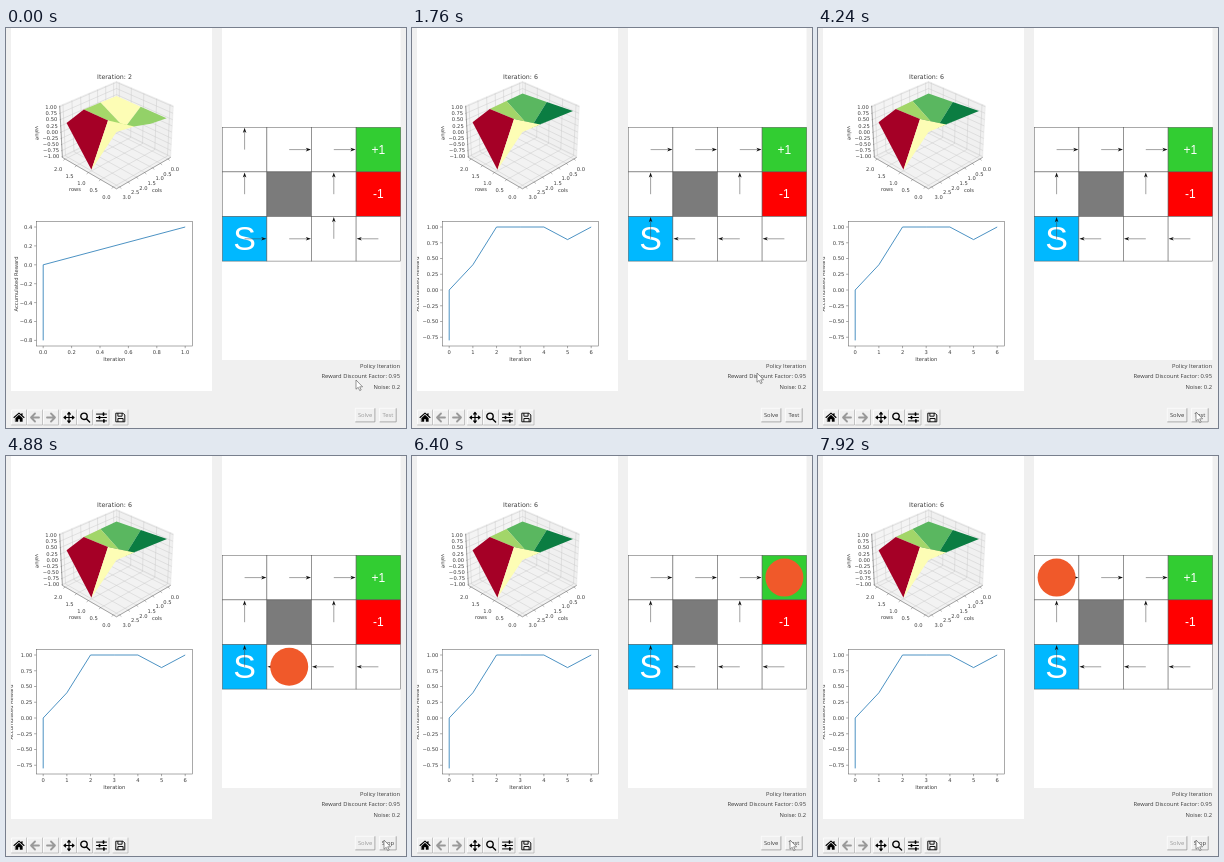
Animation of 400 by 400 pixels, one loop 8 s. Source, as an HTML page:

```html
<!DOCTYPE html>
<html lang="en">
<head>
<meta charset="utf-8">
<title>Policy iteration on a grid world</title>
<style>
  html, body { margin: 0; width: 100%; height: 100%; overflow: hidden; background: #f0f0f0; }
  svg { display: block; width: 100vw; height: 100vh; }
  .plot text { font: 5.2px "DejaVu Sans", sans-serif; fill: #3c3c3c; }
  .plot .title { font-size: 6.3px; }
  .ui { font: 5.8px "Open Sans", sans-serif; fill: #3a3a3a; }
  .cell { font-family: "Liberation Sans", Arial, sans-serif; fill: #fff; }
</style>
</head>
<body>
<svg id="stage" viewBox="0 0 400 400">
  <clipPath id="panel"><rect x="5" width="201" height="363"/></clipPath>
  <rect width="400" height="400" fill="#f0f0f0"/>
  <rect x="5" width="201" height="363" fill="#fff"/>
  <rect x="216" width="178.5" height="332" fill="#fff"/>
  <g class="plot" clip-path="url(#panel)">
    <g id="cube"></g>
    <g id="surface"></g>
    <g id="chart"></g>
  </g>
  <g id="world"></g>
  <g id="arrows"></g>
  <circle id="agent" r="19" fill="#f0592a"/>
  <g class="ui" text-anchor="end">
    <text x="394" y="339.5">Policy Iteration</text>
    <text x="394" y="350">Reward Discount Factor: 0.95</text>
    <text x="394" y="360.5">Noise: 0.2</text>
  </g>
  <g id="tools" stroke-linecap="round" stroke-linejoin="round"></g>
  <text id="coords" class="ui" x="153" y="391.5">x=5.84 y=0.762</text>
  <g id="buttons" class="ui" text-anchor="middle"></g>
  <path id="cursor" d="M0 0V9.2L2.2 7.3L3.7 10.6L5.2 9.9L3.7 6.8H6.6Z" fill="#fff" stroke="#555" stroke-width=".6"/>
</svg>
<script>
const LOOP = 8000, TICK = 80;
const el = id => document.getElementById(id);
const mix = (a, b, k) => a.map((v, i) => v + (b[i] - v) * k);
const line = (a, b, color = "#555", w = .5) =>
  `<path d="M${a}L${b}" stroke="${color}" stroke-width="${w}" fill="none"/>`;
const poly = (pts, fill, extra = "") => `<polygon points="${pts.join(" ")}" fill="${fill}" ${extra}/>`;
const text = (s, x, y, anchor = "middle", extra = "") =>
  `<text x="${x}" y="${y}" text-anchor="${anchor}" ${extra}>${s}</text>`;
const num = (v, d) => v.toFixed(d).replace("-", "\u2212");

// Latest row whose start time has passed
const at = (rows, t) => rows.filter(r => r[0] <= t).pop();

// Perspective view of the unit box from azimuth 45, elevation 30 degrees
function project(row, col, z) {
  const right = (1 - col - row) * Math.SQRT1_2, near = (col - row) * Math.SQRT1_2;
  const up = (z - .5) * .82, cos = Math.sqrt(.75);
  const k = 70 / (1 - (near * cos + up / 2) / 8.75);
  return [110.5 + k * right, 104.2 - k * (up * cos - near / 2)];
}

const LO = -.06, HI = 1.06, FLOOR = -.02, TOP = 1.02;

function drawCube() {
  const pane = 'stroke="#ddd" stroke-width=".4"';
  const face = (corners, fill) => poly(corners.map(c => project(...c)), fill, pane);
  let s = face([[HI, HI, FLOOR], [HI, LO, FLOOR], [HI, LO, TOP], [HI, HI, TOP]], "#f4f4f4") +
    face([[HI, LO, FLOOR], [LO, LO, FLOOR], [LO, LO, TOP], [HI, LO, TOP]], "#f0f0f0") +
    face([[HI, HI, FLOOR], [LO, HI, FLOOR], [LO, LO, FLOOR], [HI, LO, FLOOR]], "#f2f2f2");
  const grid = (n, path) => {
    for (let i = 0; i < n; i++) {
      const p = path(i / (n - 1)).map(c => project(...c));
      s += `<path d="M${p.join("L")}" fill="none" stroke="#c8c8c8" stroke-width=".45"/>`;
    }
  };
  grid(7, k => [[HI, k, TOP], [HI, k, FLOOR], [LO, k, FLOOR]]);
  grid(5, k => [[k, LO, TOP], [k, LO, FLOOR], [k, HI, FLOOR]]);
  grid(9, k => [[HI, HI, k], [HI, LO, k], [LO, LO, k]]);
  const left = project(HI, HI, FLOOR), front = project(LO, HI, FLOOR);
  s += line(left, project(HI, HI, TOP)) + line(left, front) + line(front, project(LO, LO, FLOOR));
  const ticks = (n, place, from, step, digits, dx, dy, anchor) => {
    for (let i = 0; i < n; i++) {
      const [x, y] = project(...place(i / (n - 1)));
      s += line([x, y], [x + dx * .25, y + dy * .12], "#555", .4) +
        text(num(from + i * step, digits), x + dx, y + dy, anchor);
    }
  };
  ticks(9, k => [HI, HI, k], -1, .25, 2, -3, 1.8, "end");
  ticks(5, k => [k, HI, FLOOR], 0, .5, 1, -7, 12.4, "middle");
  ticks(7, k => [LO, k, FLOOR], 0, .5, 1, 7, 12.4, "middle");
  s += text("rows", 69, 163) + text("cols", 151, 164);
  el("cube").innerHTML = s + text("value", 0, 0, "middle", 'transform="translate(29.5 105) rotate(88)"');
}

// Cell values by grid row, at the start and when solved; the wall counts as zero
const EARLY = [[.55, .66, .88, 1], [.55, 0, .62, -1], [.54, .57, .59, .37]];
const SOLVED = [[.84, .9, .95, 1], [.74, 0, .68, -1], [.65, .63, .61, .4]];
// Face colours by row and column of their lowest-index corner
const COLORS = {
  early: [["#93d168", "#b3df72", "#fbfcb0"], ["#fdfdb5", "#a5d86a", "#a50026"]],
  solved: [["#0b7d42", "#0b7d42", "#fdfdb5"], ["#5ab760", "#a2d669", "#a50026"]]
};
const FAR_TO_NEAR = [[1, 0], [1, 1], [0, 0], [1, 2], [0, 1], [0, 2]];

function drawSurface(iter) {
  const k = [0, .6, .9, 1, 1][iter - 2];
  const v = EARLY.map((row, i) =>
    mix(row, SOLVED[i], k).map((z, j) => project(i / 2, j / 3, (z + 1) / 2)));
  const colors = iter > 2 ? COLORS.solved : COLORS.early;
  const faces = FAR_TO_NEAR.map(([i, j]) =>
    poly([v[i][j], v[i][j + 1], v[i + 1][j + 1], v[i + 1][j]], colors[i][j]));
  el("surface").innerHTML = faces.join("") + text(`Iteration: ${iter}`, 108.5, 50.6, "middle", 'class="title"');
}

const REWARDS = [0, .4, 1, 1, 1, .8, 1];

function drawChart(iter) {
  const early = iter === 2, last = early ? 1 : iter;
  const X = v => 37.2 + 142 * v / last;
  const top = early ? .4 : 1;
  const Y = v => 199 + (top - v) * 113.4 / (top + .8);
  let s = `<rect x="30.3" y="193.7" width="156" height="124.3" fill="#fff" stroke="#555" stroke-width=".5"/>`;
  const xs = early ? .2 : iter < 5 ? .5 : 1;
  for (let i = 0; i * xs <= last + .01; i++) {
    const x = X(i * xs);
    s += line([x, 318], [x, 320.2]) + text(num(i * xs, xs < 1 ? 1 : 0), x, 326);
  }
  const ys = early ? .2 : .25, low = early ? -.8 : -.75;
  for (let i = 0; low + i * ys <= top + .01; i++) {
    let v = low + i * ys;
    if (Math.abs(v) < .01) v = 0;
    s += line([28.1, Y(v)], [30.3, Y(v)]) + text(num(v, early ? 1 : 2), 26.3, Y(v) + 1.9, "end");
  }
  const pts = [[0, -.8], ...REWARDS.slice(0, last + 1).map((v, i) => [i, v])].map(([x, y]) => [X(x), Y(y)]);
  s += `<polyline points="${pts.join(" ")}" fill="none" stroke="#1f77b4" stroke-width=".8"/>`;
  s += text("Iteration", 108.3, 332.8);
  s += text("Accumulated Reward", 0, 0, "middle", `transform="translate(${early ? 12 : 7} 256) rotate(-90)"`);
  el("chart").innerHTML = s;
}

// Grid world
const SIDE = 44.6;
const mid = (row, col) => [238.6 + SIDE * col, 121.6 + SIDE * row];

function drawWorld() {
  const special = { "03": "#32cd32", "13": "#ff0000", "11": "#7b7b7b", "20": "#00b8ff" };
  let s = "";
  for (let i = 0; i < 3; i++) for (let j = 0; j < 4; j++) {
    const [x, y] = mid(i, j);
    s += `<rect x="${x - SIDE / 2}" y="${y - SIDE / 2}" width="${SIDE}" height="${SIDE}" ` +
      `fill="${special["" + i + j] || "#fff"}" stroke="#555" stroke-width=".5"/>`;
  }
  const label = (str, row, col, size, dy) => {
    const [x, y] = mid(row, col);
    s += text(str, x, y + dy, "middle", `class="cell" font-size="${size}"`);
  };
  label("+1", 0, 3, 12, 4);
  label("-1", 1, 3, 12, 4);
  label("S", 2, 0, 34, 11.5);
  el("world").innerHTML = s;
}

// One letter per cell, row by row
const POLICY = {
  2: "URR.U.U.RRUL", 3: "RRR.U.U.RRUL", 4: "RRR.U.U.URUL",
  5: "RRR.U.U.ULUL", 6: "RRR.U.U.ULLL"
};
const TURN = { R: 0, U: -90, L: 180 };

function drawArrows(iter) {
  el("arrows").innerHTML = [...POLICY[iter]].map((d, i) => d === "." ? "" :
    `<g transform="translate(${mid(i >> 2, i & 3)}) rotate(${TURN[d]})">` +
    line([0, 0], [18, 0], "#444") + poly([[21.8, 0], [16.6, -1.8], [18, 0], [16.6, 1.8]], "#111") + "</g>").join("");
}

// Raised edge: light above and left, dark below and right
const bevel = (x, y, w, h, dark) =>
  `<path d="M${x} ${y + h}V${y}H${x + w}" fill="none" stroke="#fff" stroke-width=".7"/>` +
  `<path d="M${x} ${y + h}H${x + w}V${y}" fill="none" stroke="${dark}" stroke-width=".7"/>`;

function drawTools() {
  const icon = (x, d, color = "#000", w = 1.5, fill = "none") =>
    `<path transform="translate(${x} 389.5)" d="${d}" fill="${fill}" stroke="${color}" stroke-width="${w}"/>`;
  const frames = [13, 29, 45, 63, 79, 95.5, 114.5].map(x => bevel(x - 7.5, 382, 15, 15, "#b0b0b0")).join("");
  el("tools").innerHTML = frames +
    icon(13, "M-5 0L0 -4.4L5 0M3 -4V-2", "#000", 1.1) +
    icon(13, "M-3.4 .6L0 -2.4L3.4 .6V4H1V1.5H-1V4H-3.4Z", "#000", .4, "#000") +
    icon(29, "M4 0H-4M0 -4L-4 0L0 4", "#999", 1.8) +
    icon(45, "M-4 0H4M0 -4L4 0L0 4", "#999", 1.8) +
    icon(63, "M-4.6 0H4.6M0 -4.6V4.6M-3.4 -1.3L-5 0L-3.4 1.3M3.4 -1.3L5 0L3.4 1.3" +
      "M-1.3 -3.4L0 -5L1.3 -3.4M-1.3 3.4L0 5L1.3 3.4", "#000", 1.2) +
    icon(79, "M2.2 -1.2A3.2 3.2 0 1 1 -4.2 -1.2A3.2 3.2 0 1 1 2.2 -1.2M1.5 1.4L4.6 4.5", "#000", 1.4) +
    icon(95.5, "M-5 -3.4H5M-5 0H5M-5 3.4H5", "#000", 1) +
    icon(95.5, "M2 -4.4V-2.4M-2 -1V1M2.4 2.4V4.4", "#000", 1.7) +
    icon(114.5, "M-4.3 -4.3H2.5L4.3 -2.5V4.3H-4.3ZM-2.6 -4V-1.3H1.6V-4M-2.6 4V1H2.6V4", "#111", 1);
}

function drawButtons(solve, test, label) {
  const button = (x, w, str, on) => bevel(x, 380.3, w, 13.6, "#8c8c8c") +
    text(str, x + w / 2, 389.3, "middle", on ? "" : 'style="fill:#999"');
  el("buttons").innerHTML = button(349.3, 19.6, "Solve", solve) + button(373.6, 16.6, label, test);
}

// Timelines, each row starting with its time in ms
const ITERS = [[0, 2], [320, 3], [720, 4], [1040, 5], [1440, 6]];
const AGENT = [
  [0], [4400, 2, 0], [4640, 2, 1], [5120, 2, 0], [5600, 1, 0], [5760, 0, 0], [5840, 0, 1],
  [6080, 0, 2], [6240, 0, 3], [6800], [6960, 2, 0], [7440, 1, 0], [7760, 0, 0]];
const BUTTONS = [
  [0, false, false, "Test"], [1520, true, true, "Test"], [4400, false, true, "Stop"],
  [6400, true, true, "Test"], [6800, false, true, "Stop"]];
const POINTER = [
  [0, 350, 352], [480, 350, 352], [800, 345, 345], [1760, 345, 345], [2560, 174, 209],
  [2720, 174, 209], [2800, 175, 214], [3120, 175, 214], [3920, 356, 336],
  [4160, 356, 336], [4240, 378, 384], [LOOP, 378, 384]];

function pointer(t) {
  const i = POINTER.findIndex(p => p[0] > t);
  const a = POINTER[i - 1], c = POINTER[i];
  return mix(a, c, (t - a[0]) / (c[0] - a[0])).slice(1);
}

let shownIter, shownButtons;

function render(now) {
  const t = Math.floor(now % LOOP / TICK) * TICK;
  const iter = at(ITERS, t)[1];
  if (iter !== shownIter) {
    shownIter = iter;
    drawSurface(iter);
    drawChart(iter);
    drawArrows(iter);
  }
  const state = at(BUTTONS, t);
  if (state !== shownButtons) {
    shownButtons = state;
    drawButtons(...state.slice(1));
  }
  const [, row, col] = at(AGENT, t);
  el("agent").style.display = row === undefined ? "none" : "";
  if (row !== undefined) el("agent").setAttribute("transform", `translate(${mid(row, col)})`);
  el("coords").style.display = t >= 3120 && t < 3200 ? "" : "none";
  el("cursor").setAttribute("transform", `translate(${pointer(t)})`);
}

drawCube();
drawWorld();
drawTools();
const start = performance.now();
function frame() {
  render(performance.now() - start);
  requestAnimationFrame(frame);
}
frame();
</script>
</body>
</html>
```
